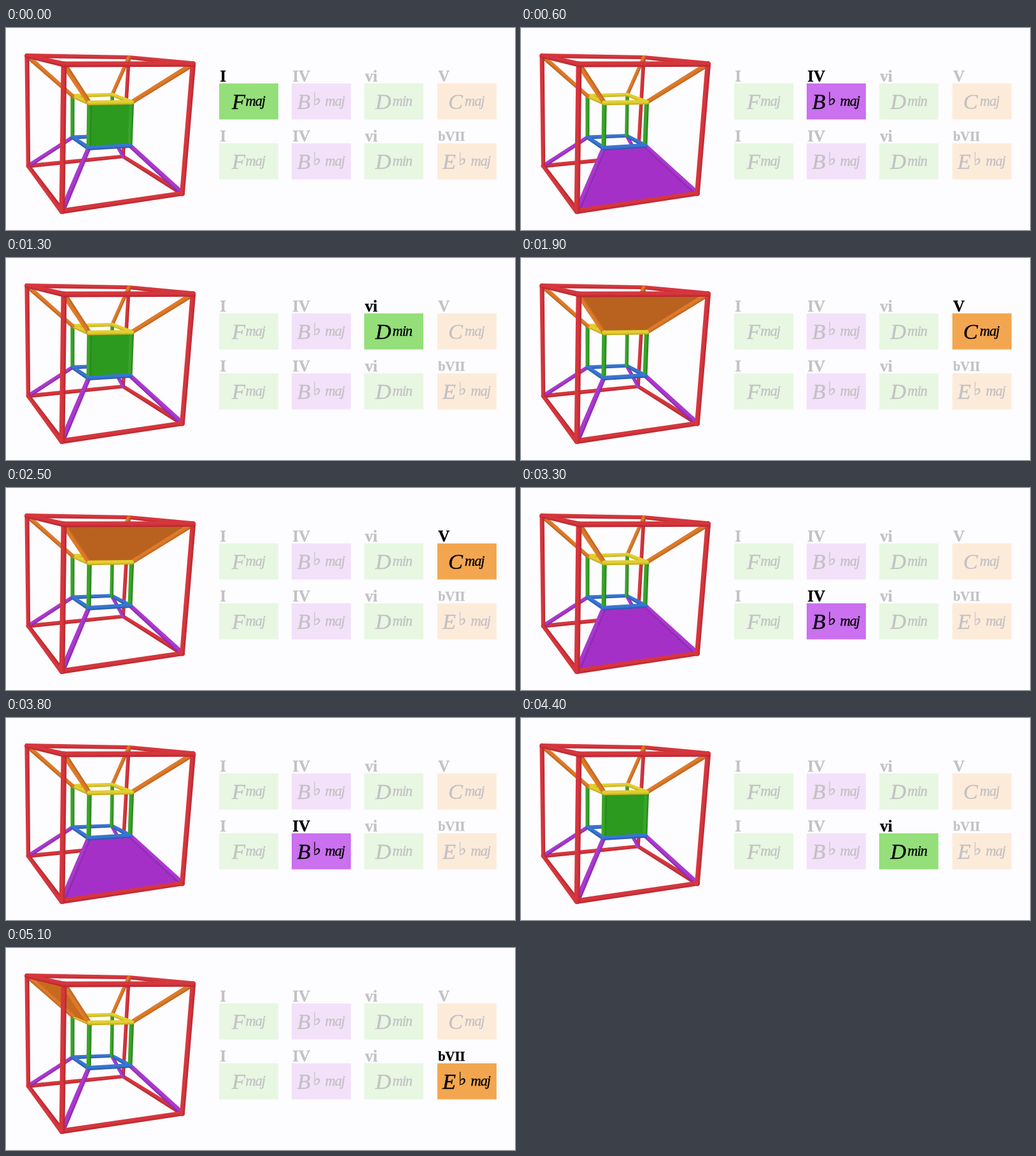
These frames come from a looping animation (800x317 px, 5200 ms). An HTML page with a canvas:

```html
<!DOCTYPE html>
<html lang="en">
<head>
<meta charset="utf-8">
<title>Chord tesseract</title>
<style>
  html, body { margin: 0; width: 100%; height: 100%; overflow: hidden; background: #fdfcfe; }
  canvas { display: block; }
</style>
</head>
<body>
<canvas id="stage" width="800" height="317"></canvas>
<script>
const ctx = document.getElementById('stage').getContext('2d');
const LOOP = 5200, TICK = 100, CHORD_MS = 650, LEAD = 50;
const PAPER = '#fdfcfe', SERIF = '"Liberation Serif", "Times New Roman", serif';

// Upper case: outer cube, lower case: inner cube; 0 = top, 1 = bottom. [x, y, bar radius]
const nodes = {
  A0: [33, 43.5, 3.6], B0: [91, 57, 4.4], C0: [294, 56.5, 4.2], D0: [193, 46, 2.9],
  A1: [35, 216.5, 3.2], B1: [88, 287.5, 4.4], C1: [277, 259.5, 3.9], D1: [184, 201.5, 2.8],
  a0: [104.5, 106.5, 3.1], b0: [131, 117.5, 3.7], c0: [197.5, 116.5, 3.6], d0: [167, 104.5, 2.8],
  a1: [104.5, 171.5, 3], b1: [130, 188.5, 3.6], c1: [195, 184.5, 3.5], d1: [166, 169, 2.8]
};
// [lit, shaded]
const paint = {
  red: ['#d6363d', '#b3262f'], orange: ['#dd7a29', '#b8601c'], yellow: ['#e2cf2e', '#bfa41d'],
  green: ['#39a528', '#257c1b'], blue: ['#3876d2', '#2556a8'], purple: ['#ab39cf', '#8428a6']
};
const faces = {
  cube: { path: 'b0 c0 c1 b1', fill: '#2b9a1f' },
  floor: { path: 'b1 c1 C1 B1', fill: '#a530c8' },
  roof: { path: 'B0 C0 c0 b0', fill: '#b9621f' },
  side: { path: 'A0 B0 b0 a0', fill: '#c76a1f' }
};

const chord = (root, suffix, rootX, suffixX, flatX) => ({ root, suffix, rootX, suffixX, flatX });
const F = chord('F', 'maj', 355, 376.5), B = chord('B', 'maj', 457.5, 501.5, 482.5),
      D = chord('D', 'min', 580.5, 607.5), C = chord('C', 'maj', 695, 721),
      E = chord('E', 'maj', 686, 730.5, 711);
// [active, dimmed]
const green = ['#94df7a', '#e7f7e2'], purple = ['#cb70ef', '#f3e1fa'], orange = ['#f3a650', '#fdebda'];
const progression = [
  ['I', F, 'cube', green], ['IV', B, 'floor', purple], ['vi', D, 'cube', green], ['V', C, 'roof', orange],
  ['I', F, 'cube', green], ['IV', B, 'floor', purple], ['vi', D, 'cube', green], ['bVII', E, 'side', orange]
];

function bar(from, to, color) {
  const [x1, y1, r1] = nodes[from], [x2, y2, r2] = nodes[to];
  const angle = Math.atan2(y2 - y1, x2 - x1);
  let nx = -Math.sin(angle), ny = Math.cos(angle);
  // Light comes from the upper left.
  if (nx + ny < 0) { nx = -nx; ny = -ny; }
  const r = (r1 + r2) / 2, [lit, shade] = paint[color];
  const fill = ctx.createLinearGradient(x1 - nx * r, y1 - ny * r, x1 + nx * r, y1 + ny * r);
  fill.addColorStop(0, lit);
  fill.addColorStop(0.5, lit);
  fill.addColorStop(1, shade);
  ctx.fillStyle = fill;
  ctx.beginPath();
  ctx.arc(x1, y1, r1, angle + Math.PI / 2, angle - Math.PI / 2);
  ctx.arc(x2, y2, r2, angle - Math.PI / 2, angle + Math.PI / 2);
  ctx.fill();
}

function bars(color, list) {
  for (const pair of list.split(' ')) bar(pair.slice(0, 2), pair.slice(2), color);
}

function drawFace(name) {
  const { path, fill } = faces[name];
  ctx.fillStyle = fill;
  ctx.beginPath();
  for (const key of path.split(' ')) ctx.lineTo(nodes[key][0], nodes[key][1]);
  ctx.fill();
}

// Painted from back to front.
function drawTesseract(face) {
  bars('red', 'A1D1 D1C1 D0D1 A0D0 D0C0');
  bars('purple', 'D1d1 A1a1');
  bars('orange', 'D0d0');
  bars('blue', 'a1d1 d1c1');
  bars('green', 'd0d1 a0a1');
  bars('yellow', 'a0d0 d0c0');
  bars('blue', 'a1b1');
  bars('yellow', 'a0b0');
  drawFace(face);
  bars('purple', 'B1b1 C1c1');
  bars('orange', 'A0a0 B0b0 C0c0');
  bars('green', 'b0b1 c0c1');
  bars('blue', 'b1c1');
  bars('yellow', 'b0c0');
  bars('red', 'A0A1 A1B1 B1C1 C0C1 B0B1 A0B0 B0C0');
}

function text(value, x, y, font, spacing = 0) {
  ctx.font = font;
  ctx.letterSpacing = spacing + 'px';
  ctx.fillText(value, x, y);
  ctx.strokeText(value, x, y);
}

function drawChord([numeral, name, , tint], index, active) {
  const x = Math.round(335 + 114.2 * (index % 4)), y = index < 4 ? 87 : 181;
  ctx.fillStyle = tint[active ? 0 : 1];
  ctx.fillRect(x, y, 93, 56.5);
  ctx.fillStyle = ctx.strokeStyle = active ? '#000' : '#c3c1c3';
  ctx.lineWidth = 0.35;
  const small = numeral.length > 3;
  text(numeral, x + 1.2, y - (small ? 4.5 : 3), `bold ${small ? 20.5 : 25}px ${SERIF}`);
  text(name.root, name.rootX, y + 40.3, `italic 34.5px ${SERIF}`);
  text(name.suffix, name.suffixX, y + 35.3, `italic 22.5px ${SERIF}`, -1.1);
  if (name.flatX) text('♭', name.flatX, y + 34, '28px "DejaVu Sans", sans-serif');
}

function render(now) {
  const time = Math.floor((now % LOOP) / TICK) * TICK;
  const current = Math.floor((time + LEAD) / CHORD_MS) % progression.length;
  ctx.fillStyle = PAPER;
  ctx.fillRect(0, 0, 800, 317);
  drawTesseract(progression[current][2]);
  progression.forEach((step, i) => drawChord(step, i, i === current));
}

const start = performance.now();
function loop() {
  render(performance.now() - start);
  requestAnimationFrame(loop);
}
loop();
</script>
</body>
</html>
```
